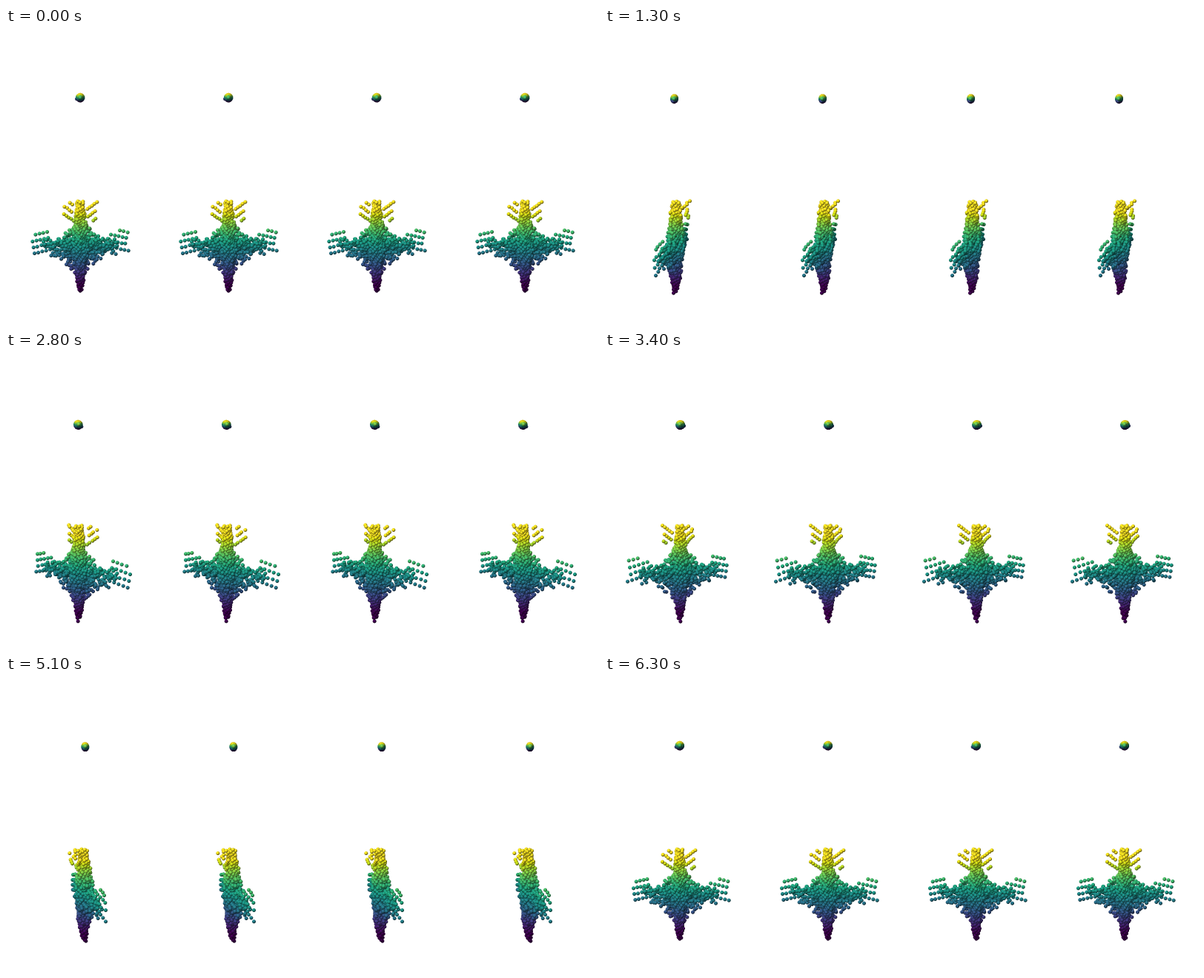
Write a matplotlib script that moves like this. It is 800 by 400 pixels and loops after 6400 ms.

```python
import numpy as np
import matplotlib.pyplot as plt
from matplotlib.animation import FuncAnimation

W, H, PANEL = 800, 400, 200
FRAMES, INTERVAL = 64, 100
SS = 3                              # supersampling per pixel
RADIUS = 2.5                        # ball radius in pixels
DIST, SIN_EL, COS_EL = 240, 0.33, 0.944
GOLDEN = np.pi * (3 - np.sqrt(5))
rng = np.random.default_rng(4)
viridis = plt.get_cmap("viridis")


def sides(n):
    """Alternate between the left and right half."""
    return np.where(np.arange(n) % 2, 1, -1)


def steps(n):
    return (np.arange(n) + 0.5) / n


def body(n=400):
    grid = np.linspace(-60, 70, 400)
    width = np.interp(grid, [-60, -35, 0, 30, 70], [2, 7, 11, 9, 4.5])
    mass = np.cumsum(width + 0.5)
    h = np.interp(steps(n), mass / mass[-1], grid)
    r = np.interp(h, grid, width) * np.sqrt(rng.uniform(0.2, 1.1, n))
    phi = np.arange(n) * GOLDEN
    v = -5.5 + 1.1 * r * np.sin(phi)
    return np.column_stack([r * np.cos(phi), v, h])


def wings(n=460):
    a = 4 - 17 * np.log(1 - 0.94 * steps(n))
    spread = 13 * np.exp((15 - a) / 28)
    h = 1 + 0.002 * a**2 + spread * rng.normal(0, 1, n).clip(-2, 2)
    v = -6 + rng.normal(0, 1, n) * (1.2 + 3 * np.exp(-a / 25))
    return np.column_stack([a * sides(n), v, h])


def wing_tips(n=40):
    a = 40 + 27 * steps(n)
    h = -10 + 36 * (np.arange(n) * 0.618 % 1) + 0.12 * (a - 40)
    v = -6 + rng.normal(0, 1, n)
    return np.column_stack([a * sides(n), v, h])


def tail(n=22):
    a = 9 + 13 * (np.arange(n) * 0.618 % 1)
    h = 42 + 28 * steps(n)
    v = 0.6 * a - 3 + rng.normal(0, 2, n)
    return np.column_stack([a * sides(n), v, h])


def small_ball(n=160):
    z = 1 - 2 * steps(n)
    phi, r = np.arange(n) * GOLDEN, np.sqrt(1 - z**2)
    ball = np.column_stack([3.9 * r * np.cos(phi), 3 * r * np.sin(phi), 4.1 * z])
    return np.vstack([ball, (-4.8, 0, -1.8)]) + (0, -7, 4.1)


def colours(points):
    h = points[:, 2]
    t = (h - h.min()) / np.ptp(h)
    return viridis((0.5 + 1.25 * (t - 0.5)).clip(0, 1))[:, :3]


nose = [(0, -8, -62.9)]
plane = np.vstack([body(), wings(), wing_tips(), tail(), nose])
clouds = [(p, colours(p), cy) for p, cy in ((small_ball(), 100), (plane, 300))]

# Shaded disc stamped once per ball
reach = int(RADIUS * SS) + 1
gy, gx = np.mgrid[-reach:reach + 1, -reach:reach + 1]
inside = gx**2 + gy**2 < (RADIUS * SS)**2
gx, gy = gx[inside], gy[inside]
nx, ny = gx / (RADIUS * SS), -gy / (RADIUS * SS)
nz = np.sqrt(1 - nx**2 - ny**2)
light = np.clip(-0.28 * nx + 0.45 * ny + 0.85 * nz, 0, 1)
shade = 0.32 + 0.76 * light


def project(points, angle, cy):
    u, v, h = points.T
    c, s = np.cos(angle), np.sin(angle)
    depth = v * c - u * s
    zoom = DIST / (DIST - depth)
    x = PANEL / 2 + (u * c + v * s) * zoom
    y = cy + (SIN_EL * depth - COS_EL * h) * zoom
    return x, y, depth * COS_EL + h * SIN_EL


def render(i):
    big = np.ones((H * SS, PANEL * SS, 3))
    for points, rgb, cy in clouds:
        x, y, near = project(points, 2 * np.pi * i / FRAMES, cy)
        order = np.argsort(near)
        px = np.rint(x[order] * SS).astype(int)[:, None] + gx
        py = np.rint(y[order] * SS).astype(int)[:, None] + gy
        tint = rgb[order][:, None, :] * shade[None, :, None]
        big[py.ravel(), px.ravel()] = tint.reshape(-1, 3).clip(0, 1)
    panel = big.reshape(H, SS, PANEL, SS, 3).mean(axis=(1, 3))
    return np.tile(panel, (1, W // PANEL, 1))


fig = plt.figure(figsize=(8, 4), dpi=100, facecolor="white")
ax = fig.add_axes([0, 0, 1, 1])
ax.axis("off")
picture = ax.imshow(render(0), interpolation="nearest", aspect="auto")


def update(i):
    picture.set_data(render(i))
    return [picture]


anim = FuncAnimation(fig, update, frames=FRAMES, interval=INTERVAL,
                     repeat=True, repeat_delay=0, blit=False)
plt.show()
```
